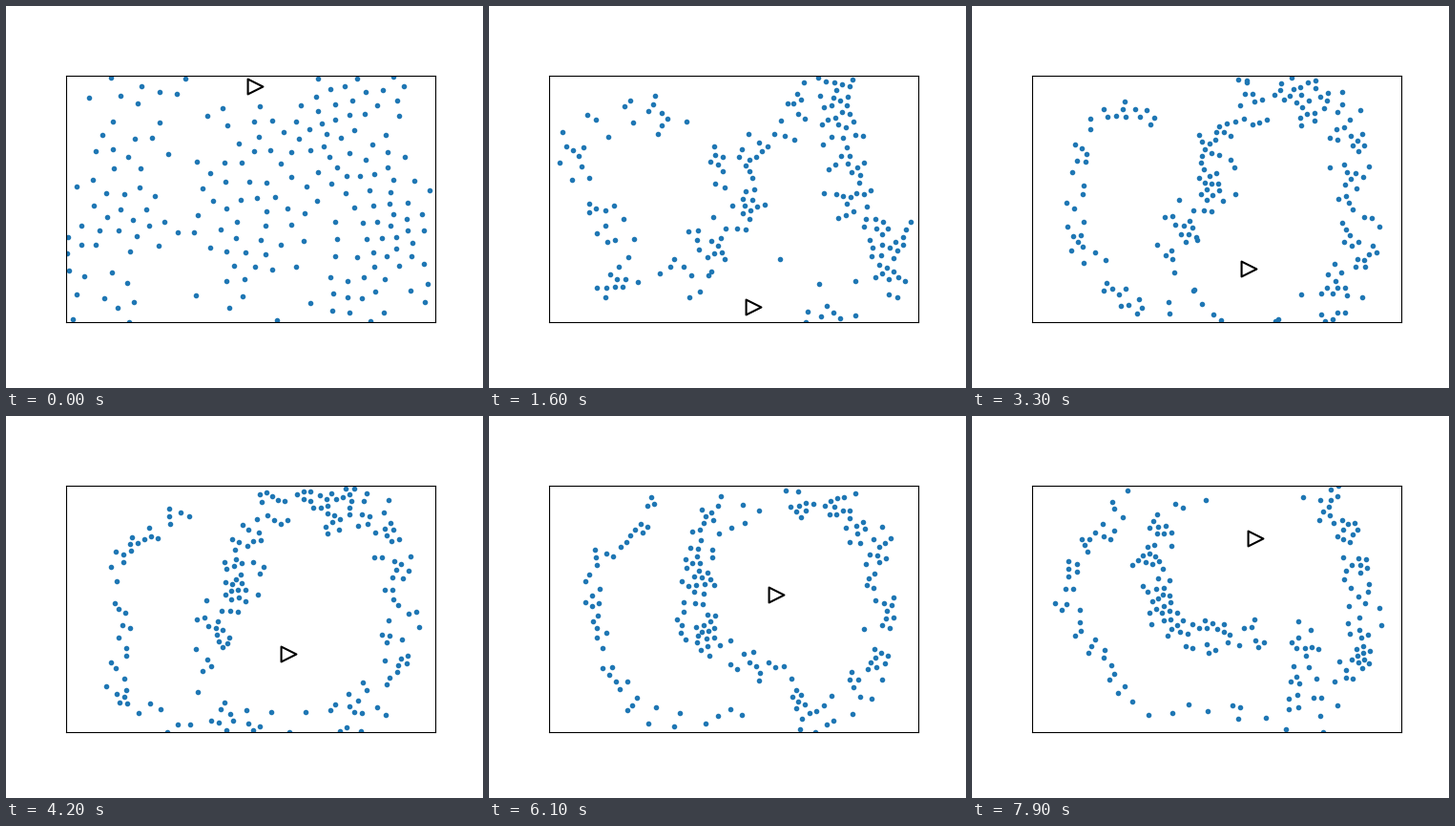
Animation of 500 by 400 pixels, one loop 8000 ms. Source, as a matplotlib script:

```python
import numpy as np
import matplotlib.pyplot as plt
from matplotlib.animation import FuncAnimation

W, H, DPI = 500, 400, 100
LOW = np.array([62.5, 72.83])         # top-left corner of the tank, in pixels
SIZE = np.array([387.5, 258.33])
FRAMES = 80
RING_DOTS, LANE_DOTS = 155, 45
rng = np.random.default_rng(7)

# Two currents, each with three poses that blend into one another.
POSE_TIMES = [10, 42, 79]

# Closed ring around the hunter: x, y, share of dots up to the next point.
RING = np.array([
    [(355, 78, 8), (310, 135, 16), (245, 172, 14), (275, 225, 12),
     (238, 248, 16), (195, 305, 5), (345, 318, 6), (430, 295, 26),
     (425, 225, 14), (370, 200, 20), (360, 140, 30)],
    [(375, 90, 28), (320, 102, 16), (255, 105, 14), (252, 165, 22),
     (222, 205, 12), (217, 245, 8), (222, 320, 14), (360, 322, 12),
     (400, 285, 12), (415, 215, 14), (412, 145, 16)],
    [(368, 85, 3), (300, 70, 3), (205, 100, 22), (184, 160, 22),
     (205, 220, 22), (262, 238, 14), (350, 225, 16), (345, 310, 8),
     (395, 275, 20), (412, 215, 16), (400, 145, 24)],
], float)
RING = np.concatenate([RING, RING[:, :1]], axis=1)

# Open lane running down the left side.
LANE = np.array([
    [(200, 150), (165, 95), (92, 125), (85, 185), (130, 215), (140, 275), (85, 315)],
    [(190, 95), (145, 125), (115, 160), (122, 230), (118, 285), (155, 318), (255, 325)],
    [(160, 78), (145, 125), (98, 150), (97, 200), (130, 245), (160, 305), (305, 308)],
], float)
LANE = np.dstack([LANE, np.ones(LANE.shape[:2])])

HUNT_TIMES = [0, 10, 23, 42, 54, 68, 79]
HUNT_X = np.polyfit(HUNT_TIMES, [261, 271.3, 283.3, 295.5, 300, 301, 297], 4)
HUNT_Y = np.polyfit(HUNT_TIMES, [342.3, 326.3, 300, 248.5, 210.3, 163.3, 128], 4)


def fold(p):
    return LOW + (p - LOW) % SIZE


def wrap(d):
    """Shortest displacement on the torus."""
    return (d + SIZE / 2) % SIZE - SIZE / 2


def disc(n):
    """Random offsets inside a unit disc."""
    r = np.sqrt(rng.random(n))
    a = rng.uniform(0, 2 * np.pi, n)
    return np.column_stack([r * np.cos(a), r * np.sin(a)])


ring_offset, lane_offset = disc(RING_DOTS), disc(LANE_DOTS)


def ease(t, *levels):
    """Level at time t, given at the start and at each pose."""
    return np.interp(t, [0] + POSE_TIMES, levels)


def along(poses, n, period, t):
    """Dots carried along a current, one lap per period."""
    k = int(t >= POSE_TIMES[1])
    a, b = POSE_TIMES[k:k + 2]
    s = np.clip((t - a) / (b - a), 0, 1)
    x, y, share = (poses[k] * (1 - s) + poses[k + 1] * s).T
    mark = np.append(0, np.cumsum(share[:-1]))
    phase = ((np.arange(n) + 0.5) / n + t / period) % 1 * mark[-1]
    return np.column_stack([np.interp(phase, mark, x), np.interp(phase, mark, y)])


def spread(p, gap):
    """Push apart dots that are closer than gap."""
    for _ in range(6):
        d = wrap(p[:, None] - p)
        r = np.hypot(d[..., 0], d[..., 1]) + 1e-6
        np.fill_diagonal(r, 1e6)
        push = np.clip(gap - r, 0, None) / r * 0.25
        p = p + (d * push[..., None]).sum(1)
    return p


def avoid(p, pos, radius):
    """Keep dots out of a circle around the hunter."""
    d = wrap(p - pos)
    r = np.hypot(*d.T)[:, None] + 1e-6
    return pos + d * np.maximum(r, radius) / r


def shoal(t, pos):
    ring = along(RING, RING_DOTS, 160, t) + ring_offset * ease(t, 62, 27, 24, 19)
    lane = along(LANE, LANE_DOTS, 80, t) + lane_offset * ease(t, 50, 22, 14, 12)
    p = spread(np.vstack([ring, lane]), ease(t, 19, 9, 8, 8))
    return fold(avoid(p, pos, ease(t, 8, 56, 64, 66)))


fig = plt.figure(figsize=(W / DPI, H / DPI), dpi=DPI, facecolor="white")
bottom = H - LOW[1] - SIZE[1]
ax = fig.add_axes((LOW[0] / W, bottom / H, SIZE[0] / W, SIZE[1] / H))
ax.set(xlim=(LOW[0], LOW[0] + SIZE[0]), ylim=(LOW[1] + SIZE[1], LOW[1]),
       xticks=[], yticks=[])
dots, = ax.plot([], [], "o", ms=3, color="#1f77b4")
arrow = ax.scatter([], [], s=130, marker=">", facecolor="white",
                   edgecolor="black", linewidth=1.5, zorder=3)


def draw(i):
    pos = fold(np.array([np.polyval(HUNT_X, i), np.polyval(HUNT_Y, i)]))
    dots.set_data(*shoal(i, pos).T)
    arrow.set_offsets([pos])
    return dots, arrow


anim = FuncAnimation(fig, draw, frames=FRAMES, interval=100, repeat=True,
                     repeat_delay=0)
plt.show()
```
